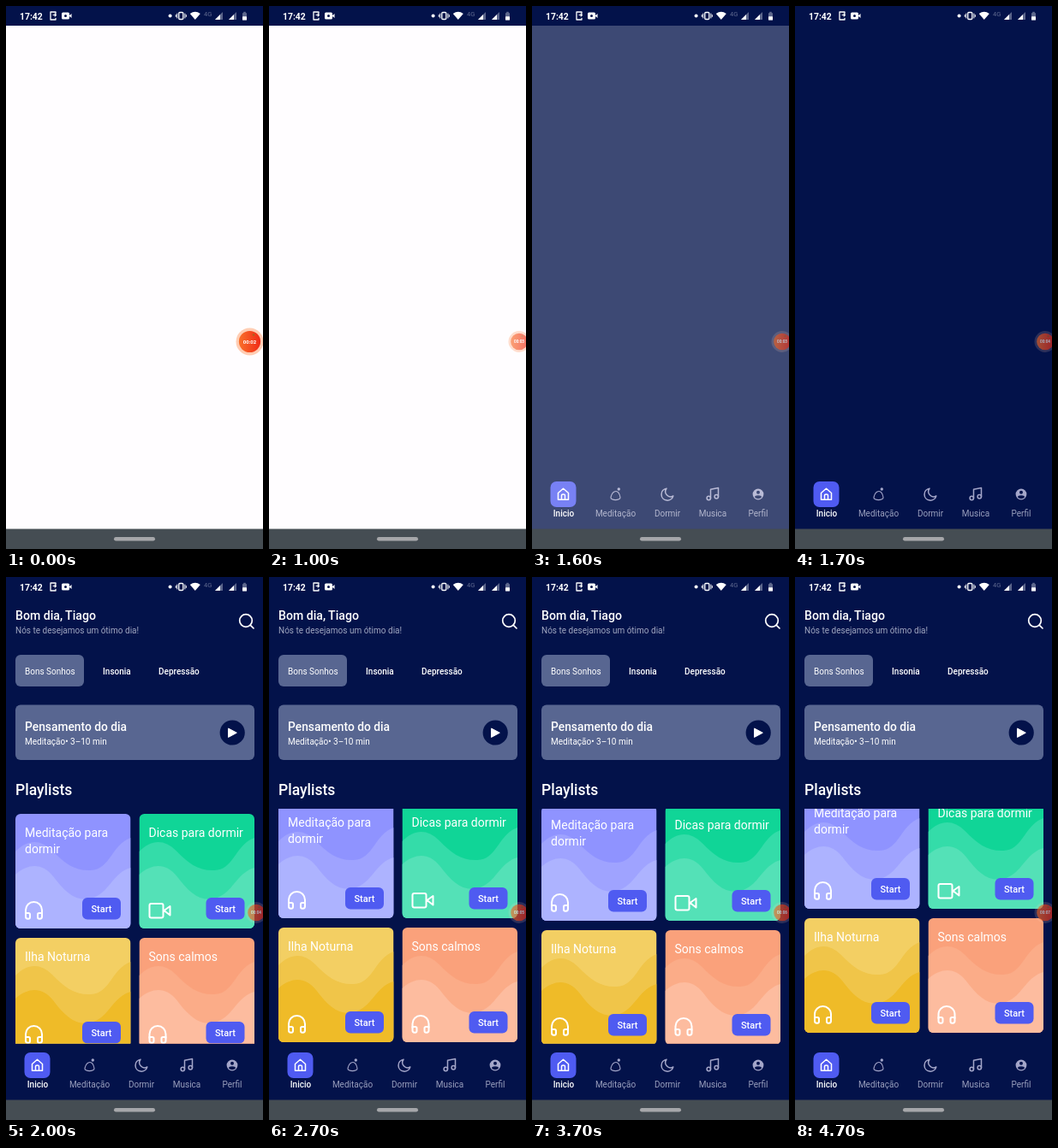
Write an HTML page that moves like this. It is 300x635 px and loops after 5100 ms.

```html
<!DOCTYPE html>
<html lang="pt">
<head>
<meta charset="utf-8">
<title>Meditação</title>
<style>
html, body { margin: 0; width: 100%; height: 100%; overflow: hidden; background: #03124a; }
svg { display: block; width: 300px; height: 635px; }
text { font-family: Roboto, "Liberation Sans", sans-serif; }
</style>
</head>
<body>
<svg id="stage" viewBox="0 0 300 635" width="300" height="635"></svg>
<script>
const NAVY = '#03124a', PANEL = '#586691', BLUE = '#4f5bf1', MUTED = '#a4a6c9';
const LOOP = 5100, STEP = 100;

const text = (x, y, size, str, fill = '#fff', extra = '') =>
  `<text x="${x}" y="${y}" font-size="${size}" fill="${fill}" ${extra}>${str}</text>`;
const rect = (x, y, w, h, fill, r = 0, extra = '') =>
  `<rect x="${x}" y="${y}" width="${w}" height="${h}" rx="${r}" fill="${fill}" ${extra}/>`;
const circle = (x, y, r, fill, extra = '') =>
  `<circle cx="${x}" cy="${y}" r="${r}" fill="${fill}" ${extra}/>`;
const shape = (d, fill, extra = '') => `<path d="${d}" fill="${fill}" ${extra}/>`;
const line = (d, color, width) =>
  `<path d="${d}" fill="none" stroke="${color}" stroke-width="${width}" stroke-linecap="round" stroke-linejoin="round"/>`;
const MEDIUM = 'font-weight="500"', MID = 'text-anchor="middle"';

const headphones = line('M1 15V10.5a9.5 9.5 0 0 1 19 0V15', '#fff', 2) +
  line('M1 14h3.2q1.8 0 1.8 1.8v3q0 1.9-1.9 1.9H3.400q-2.400 0-2.400-2.400zM20 14h-3.200q-1.800 0-1.800 1.800v3q0 1.900 1.900 1.900h.7q2.400 0 2.400-2.400z', '#fff', 2);
const camera = line('M3 3h12q2 0 2 2v12.500q0 2-2 2H3q-2 0-2-2V5q0-2 2-2zM18 11l7-5v10.500z', '#fff', 2);

function card(x, y, title, colors, icon) {
  const [top, mid, low] = colors;
  return `<g transform="translate(${x} ${y})"><g clip-path="url(#cardClip)">` +
    rect(0, 0, 134.5, 134, top) +
    shape('M0 44C14 30 29 29 43 43C57 58 70 67 88 66C111 65 112 36 134.500 28V134H0Z', mid) +
    shape('M0 71C16 57 32 58 44 73C58 92 71 103 88 99C109 94 113 69 134.500 63V134H0Z', low) + '</g>' +
    title.map((s, i) => text(11, 26.5 + 19 * i, 14, s)).join('') +
    `<g transform="translate(11 102)">${icon}</g>` +
    rect(78, 98, 45, 25.5, BLUE, 6) +
    text(100.5, 114.8, 11, 'Start', '#fff', MEDIUM + ' ' + MID) + '</g>';
}

const defs = `<defs>
  <clipPath id="cardClip"><rect width="134.5" height="134" rx="6"/></clipPath>
  <clipPath id="listClip"><rect y="271" width="300" height="274.500"/></clipPath>
  <linearGradient id="hot"><stop stop-color="#f9702a"/><stop offset="1" stop-color="#f02a17"/></linearGradient>
</defs>`;

const header =
  text(11, 49.5, 14.1, 'Bom dia, Tiago', '#fff', MEDIUM) +
  text(11, 66, 10, 'Nós te desejamos um ótimo dia!', '#a0a6c0') +
  `<circle cx="280" cy="51" r="7.300" fill="none" stroke="#fff" stroke-width="1.700"/>` +
  line('M285.300 56.300L289 60', '#fff', 1.7) +
  rect(11, 91, 80, 37, PANEL, 6) +
  text(22, 113.6, 10, 'Bons Sonhos') +
  text(113, 113.6, 10, 'Insonia', '#fff', MEDIUM) +
  text(178, 113.6, 10, 'Depressão', '#fff', MEDIUM) +
  rect(11, 149.5, 279, 64.5, PANEL, 6) +
  text(22, 179.6, 13.8, 'Pensamento do dia', '#fff', MEDIUM) +
  text(22, 196, 10, 'Meditação• 3–10 min') +
  circle(264.2, 182, 14.6, NAVY) +
  shape('M259.500 177v10.400l9.800-5.200z', '#fff', 'stroke="#fff" stroke-linejoin="round"') +
  text(11, 255, 17.5, 'Playlists', '#fff', MEDIUM);

const cards =
  card(11, 277, ['Meditação para', 'dormir'], ['#8f93ff', '#9fa3ff', '#adb3ff'], headphones) +
  card(155.5, 277, ['Dicas para dormir'], ['#10d597', '#34dca9', '#54e1b7'], camera) +
  card(11, 422, ['Ilha Noturna'], ['#f3cf63', '#f0c549', '#efbb28'], headphones) +
  card(155.5, 422, ['Sons calmos'], ['#faa17b', '#fbac88', '#fdbc9f'], headphones);

const tabs =
  rect(21.5, 556, 30, 30, BLUE, 7) +
  line('M30.500 569.500l6-5.200l6 5.200v7.700h-12zM34.500 577v-4.500q0-1.500 2-1.500t2 1.500v4.500', '#fff', 1.5) +
  line('M92 574.500c1-4 3.200-7 6-7s4.300 3.500 5 7c.6 4.200-11.800 4.200-11 0z', MUTED, 1.1) +
  circle(101.3, 565, 1.7, MUTED) +
  line('M157 564.200a7 7 0 1 0 7.800 8.800a6 6 0 0 1-7.800-8.800z', MUTED, 1.5) +
  line('M208.500 575.500v-10.300l9-1.700v10.300', MUTED, 1.5) +
  `<g fill="none" stroke="${MUTED}" stroke-width="1.500"><circle cx="206.300" cy="575.500" r="2.200"/><circle cx="215.300" cy="573.800" r="2.200"/></g>` +
  circle(264, 571, 6.4, MUTED) + circle(264, 568.8, 2, NAVY) +
  shape('M260 574.500q0-2.300 4-2.300t4 2.300q-1.500 1.800-4 1.800t-4-1.800z', NAVY) +
  [['Inicio', 37], ['Meditação', 97.5], ['Dormir', 158], ['Musica', 211], ['Perfil', 264]]
    .map(([s, x], i) => text(x, 597.4, 10, s, i ? '#9a9fbd' : '#fff', MID + (i ? '' : ' ' + MEDIUM))).join('');

const signal = x =>
  shape(`M${x} 16h9V7z`, '#5d678c') + shape(`M${x} 16h6V10z`, '#fff');
const statusBar = rect(0, 0, 300, 23, NAVY) +
  text(16, 15.6, 10.4, '17:42', '#fff', 'font-weight="700"') +
  line('M58 8.500V7h-6v9h6v-1.500', '#fff', 1.3) +
  line('M55 10.500h3.500M57 9l1.500 1.500L57 12', '#fff', 1.1) +
  rect(65, 7.5, 9, 8, '#fff', 1.5) + shape('M73.500 11.500l3-2.500v5z', '#fff') +
  circle(69.5, 11.5, 1.5, NAVY) +
  circle(191.6, 11.5, 2, '#fff') +
  rect(201.8, 7.5, 5, 8, 'none', 1, 'stroke="#fff" stroke-width="1.300"') +
  line('M199.800 9v5M208.900 9v5M198.300 10.500v2M210.300 10.500v2', '#fff', 1) +
  shape('M214.800 9q6-4.500 12 0l-6 7z', '#fff') +
  text(231, 12.3, 7.5, '4G', '#626b91') + signal(244) + signal(260) +
  rect(276, 8, 5, 8.5, '#5d678c', .7) + rect(277.2, 6.8, 2.6, 1.5, '#5d678c') +
  rect(276, 12.3, 5, 4.2, '#fff', .5);

const navBar = rect(0, 611.5, 300, 24, '#454d53') + rect(126, 621, 48, 4.6, '#a6a7aa', 2.3);

const recorder = `<g id="rec">` + circle(0, 0, 16, '#ffcdb4', 'id="ring"') +
  circle(0, 0, 12.6, 'url(#hot)') + circle(4.5, -8, 1.3, '#a8641f') +
  `<text id="clock" y="2.500" font-size="6" font-weight="700" fill="#fff" text-anchor="middle"></text></g>`;

const stage = document.getElementById('stage');
stage.innerHTML = defs + rect(0, 0, 300, 635, NAVY) +
  `<g id="home">${header}<g clip-path="url(#listClip)"><g id="list">${cards}</g></g></g>` +
  tabs + rect(0, 23, 300, 589, '#fffdff', 0, 'id="veil"') + statusBar + navBar + recorder;

const el = {};
for (const id of ['home', 'list', 'veil', 'rec', 'ring', 'clock']) el[id] = document.getElementById(id);

// [start time, value] pairs, each held until the next one
const veilKeys = [[0, 1], [1500, .6], [1600, .23], [1700, 0]];
const scrollKeys = [[0, 0], [2700, 12], [3100, 23], [3700, 9], [4100, 2], [4200, 0], [4700, 23]];
const held = (keys, t) => keys.reduce((v, [at, next]) => t >= at ? next : v, 0);
const ramp = (t, from, to) => Math.min(1, Math.max(0, (t - from) / (to - from)));
const ease = p => p * p * (3 - 2 * p);

function draw(ms) {
  const t = Math.floor((ms % LOOP) / STEP) * STEP;
  const slide = ease(ramp(t, 0, 600)), fade = ramp(t, 600, 1000);
  el.home.setAttribute('visibility', t >= 2000 ? 'visible' : 'hidden');
  el.veil.setAttribute('opacity', held(veilKeys, t));
  el.list.setAttribute('transform', `translate(0 ${-held(scrollKeys, t)})`);
  el.rec.setAttribute('transform', `translate(${284.5 + 7.5 * slide} 392.500) scale(${1 - .22 * slide})`);
  el.rec.setAttribute('opacity', 1 - .35 * fade);
  el.ring.setAttribute('opacity', t < 1500 ? 1 : .25);
  el.clock.textContent = '00:0' + (2 + Math.floor((t + 300) / 1000));
}

const start = performance.now();
function tick() {
  draw(performance.now() - start);
  requestAnimationFrame(tick);
}
tick();
</script>
</body>
</html>
```
